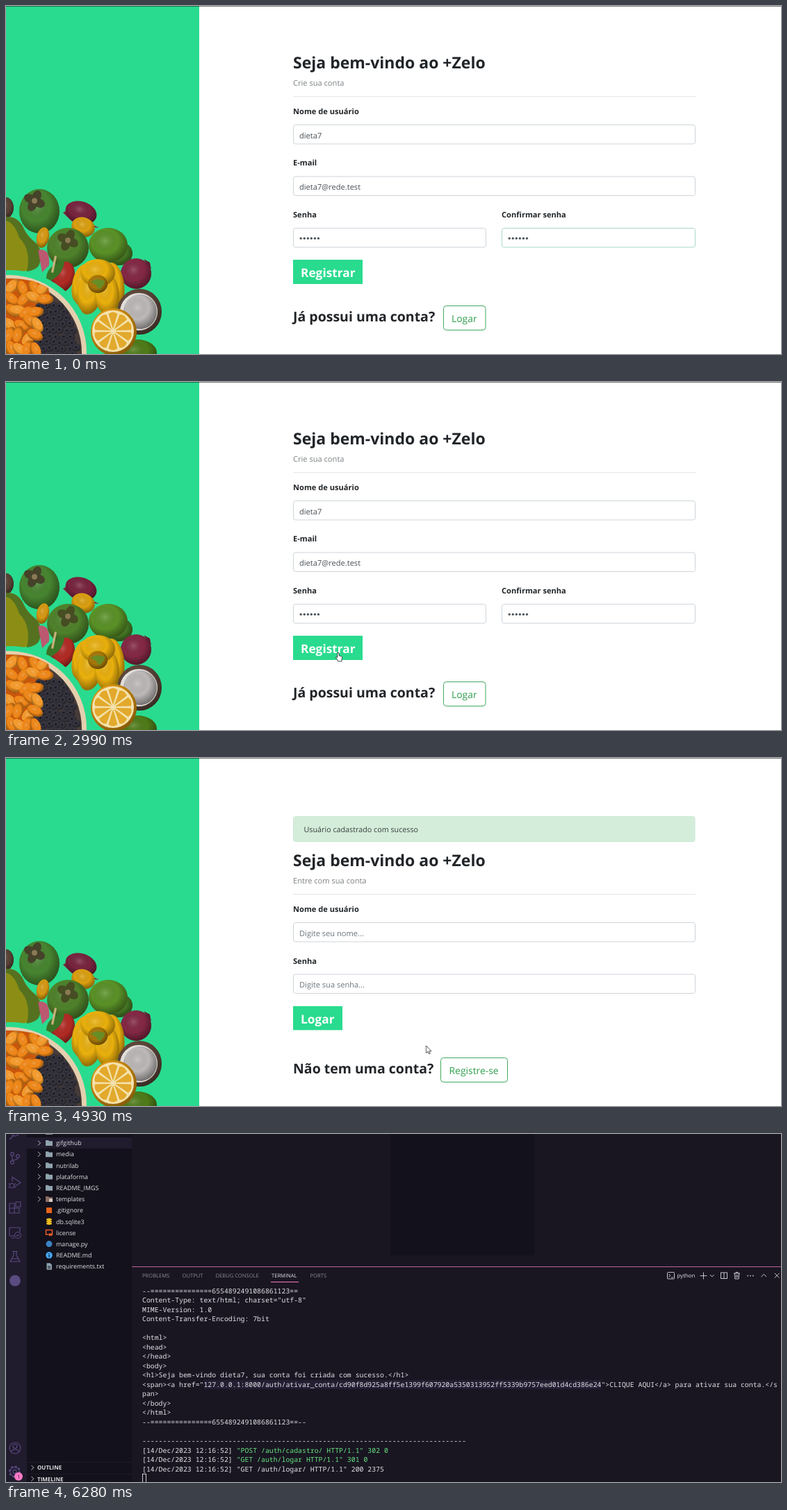
An HTML page for the animation above (8000 ms loop, 1115 px wide and 502 px high).

```html
<!DOCTYPE html>
<html lang="pt-BR">
<head>
<meta charset="utf-8">
<title>Cadastro</title>
<style>
html, body { margin: 0; width: 100%; height: 100%; overflow: hidden; background: #fff; }
svg { display: block; width: 100vw; height: 100vh; }
text { font-family: "Open Sans", "Noto Sans", sans-serif; font-size: 11.1px; fill: #212529; white-space: pre; text-rendering: geometricPrecision; }
.title { font-size: 23px; font-weight: 700; }
.ask { font-size: 19.5px; font-weight: 700; }
.label { font-weight: 700; }
.sub { fill: #7d8184; }
.hint { fill: #6c757d; }
.value { fill: #495057; }
.cta { font-size: 17.3px; font-weight: 700; fill: #fff; }
.alt { font-size: 13.9px; fill: #2f9e4d; }
.field { fill: #fff; stroke: #ced4da; }
.solid, .side { fill: #29db8e; }
.ghost { fill: #fff; stroke: #3fa95c; }
.rule { stroke: #e6e6e6; }

.tree text { font-size: 8.9px; fill: #e1e1e6; }
.tabs text { font-size: 7.6px; fill: #8d8a97; }
.tabs .on, .tabs .shell { fill: #e1e1e6; }
.tabs .shell { font-size: 7.9px; }
.heads text { font-size: 8px; font-weight: 700; fill: #e1e1e6; }
.term text { font-family: "Noto Sans Mono", "DejaVu Sans Mono", monospace; font-size: 9.83px; fill: #e1e1e6; }
.term .ok { fill: #67e480; }
.line { fill: none; stroke: #5a4b81; stroke-width: 1.1; }
.tool { fill: none; stroke: #d5d3dc; stroke-width: .9; }

.register, .login, .editor, .focus, .click, .arrow, .beam, .hand { animation: 8s step-end infinite; }
.register { animation-name: register; }
.login { animation-name: login; }
.editor { animation-name: editor; }
.focus { animation-name: focus; }
.click { animation-name: click; }
.arrow { animation-name: arrow; }
.beam { animation-name: beam; }
.hand { animation-name: hand; }
.pointer { animation: path 8s infinite; }

@keyframes register { 0% { opacity: 1 } 51%, 100% { opacity: 0 } }
@keyframes login { 0% { opacity: 0 } 51% { opacity: 1 } 78.5%, 100% { opacity: 0 } }
@keyframes editor { 0% { opacity: 0 } 78.5%, 100% { opacity: 1 } }
@keyframes focus { 0% { stroke: #a9d9c8 } .875%, 100% { stroke: #ced4da } }
@keyframes click {
  0%, 45.125% { opacity: 0 } 43.375% { opacity: 1 }
  76.875% { opacity: 1 } 78.5%, 100% { opacity: 0 }
}
@keyframes arrow {
  0%, 6.625%, 11%, 21.5%, 25.33% { opacity: 0 }
  3.125%, 7.5%, 16.875%, 24.37%, 61.625% { opacity: 1 }
  72.75%, 100% { opacity: 0 }
}
@keyframes beam {
  0%, 7.5%, 16.875%, 24.37% { opacity: 0 }
  6.625%, 11%, 21.5% { opacity: 1 }
  100% { opacity: 0 }
}
@keyframes hand { 0% { opacity: 0 } 25.33% { opacity: 1 } 61.625%, 100% { opacity: 0 } }
@keyframes path {
  0% { transform: translate(969px, 464px); animation-timing-function: step-end }
  3.125% { transform: translate(969px, 464px); animation-timing-function: steps(4) }
  6.625% { transform: translate(680px, 320px); animation-timing-function: steps(6) }
  11.875% { transform: translate(566.5px, 264px); animation-timing-function: step-end }
  14.25% { transform: translate(566.5px, 264px); animation-timing-function: steps(4, start) }
  17.75% { transform: translate(563px, 276px); animation-timing-function: step-end }
  18.625% { transform: translate(563px, 276px); animation-timing-function: steps(9, start) }
  27.25% { transform: translate(494px, 381px); animation-timing-function: steps(2, start) }
  28.99% { transform: translate(485px, 393px); animation-timing-function: step-end }
  29% { transform: translate(484px, 395px); animation-timing-function: step-end }
  31.5% { transform: translate(484px, 395px); animation-timing-function: steps(7, start) }
  38.35% { transform: translate(478px, 390px); animation-timing-function: step-end }
  61.625% { transform: translate(604.5px, 415px); animation-timing-function: steps(4) }
  65.125% { transform: translate(862px, 462px); animation-timing-function: steps(7) }
  71.125% { transform: translate(1034px, 493px); animation-timing-function: step-end }
  71.875% { transform: translate(1036px, 496px); animation-timing-function: step-end }
  72.75%, 100% { transform: translate(1047px, 508px); animation-timing-function: step-end }
}
</style>
</head>
<body>
<svg viewBox="0 0 1115 502">
  <defs>
    <radialGradient id="shade" cx=".42" cy=".38" r=".62">
      <stop offset="0" stop-color="#fff" stop-opacity=".2"/>
      <stop offset=".55" stop-color="#000" stop-opacity="0"/>
      <stop offset="1" stop-color="#000" stop-opacity=".38"/>
    </radialGradient>
    <clipPath id="bowl"><circle cx="4" cy="500" r="109"/></clipPath>
  </defs>

  <rect width="1115" height="502" fill="#fff"/>
  <rect class="side" width="278" height="502"/>
  <g id="food"></g>
  <rect width="1115" height="1" fill="#000" opacity=".5"/>

  <g class="register">
    <text class="title" x="413" y="90">Seja bem-vindo ao +Zelo</text>
    <text class="sub" x="413" y="114.5">Crie sua conta</text>
    <path class="rule" d="M413 130.5H992"/>
    <text class="label" x="413" y="156">Nome de usuário</text>
    <rect class="field" x="413.5" y="171.5" width="578" height="27.5" rx="3"/>
    <text class="value" x="422" y="190.5">dieta7</text>
    <text class="label" x="413" y="230">E-mail</text>
    <rect class="field" x="413.5" y="246" width="578" height="27.5" rx="3"/>
    <text class="value" x="422" y="264.5">dieta7@rede.test</text>
    <text class="label" x="413" y="305">Senha</text>
    <rect class="field" x="413.5" y="320.5" width="277" height="27.5" rx="3"/>
    <text class="label" x="713" y="305">Confirmar senha</text>
    <rect class="field focus" x="713.5" y="320.5" width="278" height="27.5" rx="3"/>
    <g id="dots" fill="#495057"></g>
    <rect class="solid" x="413" y="366" width="100" height="35"/>
    <text class="cta" x="424" y="390.5">Registrar</text>
    <text class="ask" x="413" y="455.3">Já possui uma conta?</text>
    <rect class="ghost" x="629.5" y="432.5" width="60.5" height="35" rx="4"/>
    <text class="alt" x="641" y="456">Logar</text>
  </g>

  <g class="login">
    <rect x="413.5" y="84.5" width="577.5" height="36" rx="3" fill="#d4edda" stroke="#c8e8d0"/>
    <text x="428.5" y="107" style="font-size:10.75px;fill:#363d39">Usuário cadastrado com sucesso</text>
    <text class="title" x="413" y="156">Seja bem-vindo ao +Zelo</text>
    <text class="sub" x="413" y="180.5">Entre com sua conta</text>
    <path class="rule" d="M413 196.5H992"/>
    <text class="label" x="413" y="222">Nome de usuário</text>
    <rect class="field" x="413.5" y="237.5" width="578" height="27.5" rx="3"/>
    <text class="hint" x="422" y="256.5">Digite seu nome...</text>
    <text class="label" x="413" y="296.5">Senha</text>
    <rect class="field" x="413.5" y="312" width="578" height="27.5" rx="3"/>
    <text class="hint" x="422" y="330.7">Digite sua senha...</text>
    <rect class="solid" x="413" y="358" width="71" height="34.5"/>
    <text class="cta" x="424" y="382.5">Logar</text>
    <text class="ask" x="413" y="455.3">Não tem uma conta?</text>
    <rect class="ghost" x="625.5" y="432.5" width="96" height="35" rx="4"/>
    <text class="alt" x="637.5" y="456">Registre-se</text>
  </g>

  <g class="pointer">
    <circle class="click" r="9" fill="#ffff1e"/>
    <path class="arrow" d="M0 0V10.6L2.5 8.4 4.1 12 5.7 11.3 4.2 7.8H7.4Z" fill="#fff" stroke="#222" stroke-width=".8"/>
    <path class="beam" d="M-2.5-6Q-.3-6 0-5V5Q-.3 6-2.5 6M2.5-6Q.3-6 0-5M2.5 6Q.3 6 0 5" fill="none" stroke="#333" stroke-width=".9"/>
    <path class="hand" d="M-1.2 1Q0-.6 1.1 1V4.8L4.8 5.8Q5.9 6.2 5.7 7.6L4.9 11V13H-.6V11.6L-3.6 7.6Q-3.5 6-2 6.8L-1.2 7.5Z" fill="#fff" stroke="#222" stroke-width=".8"/>
  </g>

  <g class="editor">
    <rect width="1115" height="502" fill="#191622"/>
    <rect width="30" height="502" fill="#201b2d"/>
    <rect x="30" width="151" height="502" fill="#13111b"/>
    <rect x="30" y="5" width="151" height="16" fill="#201b2d"/>
    <rect x="553" y="-32" width="207" height="207" fill="#13111b"/>
    <path d="M181 191.5H1115" stroke="#c75f9e"/>

    <g class="line">
      <path d="M5 8L10 3M9 1Q13 5 18 1"/>
      <circle cx="9" cy="29" r="2.4"/><circle cx="9" cy="41" r="2.4"/><circle cx="17" cy="32" r="2.4"/>
      <path d="M9 31.5V38.5M17 34.5Q17 37.5 9 37.5"/>
      <path d="M9 68V62L21 70 13 75.5"/><circle cx="8.5" cy="74.5" r="3.2"/>
      <path d="M3 72H5M3 77H5M12 72H14M12 77H14"/>
      <path d="M5 100H12V114H5ZM5 107H19V114H12M14 98H21V105H14Z"/>
      <path d="M12 147H5V135H20V141M8 150H12"/><circle cx="17" cy="146" r="4.5"/><path d="M15 146L16.5 147.5 19 144.5"/>
      <path d="M9 169.5H17M11 170V175L6 184H20L15 175V170M8.5 180H17.5"/>
      <circle cx="13" cy="453" r="8"/><circle cx="13" cy="450.5" r="3"/><path d="M7.5 459Q8 455 13 455 18 455 18.5 459"/>
      <circle cx="12.5" cy="487" r="2.6"/><circle cx="12.5" cy="487" r="6.4"/><circle cx="12.5" cy="487" r="7.6" stroke-dasharray="3 2.97" stroke-width="2"/>
    </g>
    <circle cx="13" cy="211.5" r="8" fill="#5a4b81"/>
    <circle cx="18" cy="494" r="6" fill="#ff79c6"/>
    <text x="16.2" y="496.7" style="font-size:7px;fill:#201b2d">1</text>

    <g class="tree" id="tree"></g>
    <g class="heads">
      <path d="M30 473.5H181M30 490.5H181" stroke="#201b2d"/>
      <path class="tool" d="M36.5 478L39.8 481.3 36.5 484.6M36.5 494L39.8 497.3 36.5 500.6"/>
      <text x="45" y="484.3">OUTLINE</text>
      <text x="45" y="500.5">TIMELINE</text>
    </g>

    <g class="tabs">
      <text x="196" y="207">PROBLEMS</text>
      <text x="253.5" y="207">OUTPUT</text>
      <text x="301.5" y="207">DEBUG CONSOLE</text>
      <text class="on" x="382" y="207">TERMINAL</text>
      <text x="437.5" y="207">PORTS</text>
      <path d="M381 213.5H421" stroke="#ff79c6"/>
      <text class="shell" x="965.5" y="207.3">python</text>
    </g>
    <g class="tool">
      <rect x="951.5" y="199.5" width="10" height="9.5" rx="1"/><path d="M953.5 202L956 204.2 953.5 206.5M957 207H960"/>
      <path d="M998.5 204.5H1008.5M1003.5 199.5V209.5M1013 203L1015.8 206 1018.5 203"/>
      <rect x="1028.5" y="200" width="9" height="8.5"/><path d="M1033 200V208.5"/>
      <path d="M1047 201H1056M1050 201V199.5H1053V201M1048.2 201L1048.8 209H1054.2L1054.8 201M1050.5 203V207.3M1052.6 203V207.3"/>
      <path d="M1066.5 204.5H1068M1070.3 204.5H1071.8M1074.1 204.5H1075.6" stroke-width="1.5"/>
      <path d="M1086.5 206L1090.3 202.3 1094 206M1105.8 200.8L1112.5 207.5M1112.5 200.8L1105.8 207.5"/>
    </g>

    <rect x="284.7" y="354.7" width="572" height="13.3" fill="#231e31"/>
    <g class="term" id="term"></g>
    <rect x="196.5" y="490.5" width="5" height="13" fill="none" stroke="#e1e1e6" stroke-width=".9"/>
  </g>
</svg>

<script>
const byId = id => document.getElementById(id);

function add(parent, tag, attrs, text) {
  const el = document.createElementNS(parent.namespaceURI, tag);
  for (const key in attrs) el.setAttribute(key, attrs[key]);
  if (text) el.textContent = text;
  return parent.appendChild(el);
}

let seed = 7;
const rand = () => (seed = seed * 16807 % 2147483647) / 2147483647;

// Still life
const food = byId('food');
function blob(cx, cy, rx, ry, fill, turn = 0, parent = food) {
  const at = { cx, cy, rx, ry, transform: `rotate(${turn} ${cx} ${cy})` };
  add(parent, 'ellipse', { ...at, fill });
  add(parent, 'ellipse', { ...at, fill: 'url(#shade)' });
}
const shape = (d, fill, parent = food) => add(parent, 'path', { d, fill });
function calyx(x, y, size, fill) {
  for (let i = 0; i < 4; i++) {
    const turn = i * 90 + 25;
    add(food, 'ellipse', { cx: x, cy: y - size * .55, rx: size * .45, ry: size * .6, fill, transform: `rotate(${turn} ${x} ${y})` });
  }
  add(food, 'circle', { cx: x, cy: y, r: size * .28, fill: '#8a7a55' });
}

blob(0, 291, 11, 15, '#5a4336');
blob(48, 296, 29, 32, '#478530');
calyx(41, 281, 14, '#45422a');
shape('M82 298Q94 292 98 284L118 312 134 320Q110 318 94 310Z', '#7a2640');
blob(108, 298, 23, 16, '#78243f', 18);
blob(111, 319, 17, 14, '#dca00f', 20);
shape('M0 304Q16 303 24 318 30 332 43 342 54 354 48 372 38 384 0 386Z', '#8c8d14');
shape('M0 304Q16 303 24 318 30 332 43 342 54 354 48 372 46 380 30 383 37 352 19 334 12 312 0 310Z', '#55711f');
shape('M46 352Q64 348 62 374L52 384Z', '#bc5870');
blob(53, 334, 9, 15, '#d99a12', 12);
blob(163, 357, 19, 17, '#477a25');
blob(147, 345, 28, 25, '#5a9227');
blob(89, 349, 30, 29, '#4f822b');
calyx(89, 338, 14, '#464d22');
blob(82, 391, 16, 23, '#b32a24', 20);
shape('M58 392Q58 376 84 366 84 388 58 400Z', '#3b7427');
shape('M70 360L65 384 68 385 73 361Z', '#c8b07a');
blob(187, 386, 22, 22, '#842845');
shape('M198 365L207 370 209 380Z', '#5f1c34');
for (const [x, y, rx, ry, turn] of [[110, 402, 15, 30, 10], [156, 402, 14, 32, -8], [120, 414, 18, 31, 8], [145, 415, 18, 31, -6], [132, 385, 25, 20, 0]])
  blob(x, y, rx, ry, '#eab00d', turn);
blob(132, 401, 14, 13, '#a87808');
shape('M122 398Q131 391 143 397L139 404 134 409 129 402Z', '#678d25');
blob(192, 441, 32, 33, '#5d473b');
add(food, 'circle', { cx: 191, cy: 441, r: 27, fill: '#e2dfdc' });
blob(193, 441, 24, 25, '#bcb9b8');
blob(188, 500, 29, 19, '#4f7c19');
blob(155, 470, 33, 34, '#d9930f');
add(food, 'ellipse', { cx: 154, cy: 469, rx: 30, ry: 30, fill: '#f4e2ad' });
for (let i = 0; i < 10; i++)
  add(food, 'path', { d: 'M154 466L147.5 444Q154 439 160.5 444Z', fill: '#e2a92c', transform: `rotate(${i * 36} 154 469)` });

add(food, 'circle', { cx: 7, cy: 498, r: 117, fill: '#29db8e' });
add(food, 'circle', { cx: 4, cy: 500, r: 112, fill: '#e4cfae' });
const bowl = add(food, 'g', { 'clip-path': 'url(#bowl)' });
add(bowl, 'circle', { cx: 4, cy: 500, r: 105, fill: '#463b38' });
shape('M0 393Q35 392 60 405L66 425 42 440 38 502H0Z', '#c9560c', bowl);
for (let row = 0; row < 9; row++)
  for (let col = 0; col < 9; col++) {
    const x = 48 + col * 9.5 + row % 2 * 4.7 + rand() * 3, y = 431 + row * 8.8 + rand() * 3;
    if (Math.hypot(x - 4, y - 500) > 101) continue;
    blob(x, y, 5.6, 5.6, '#34333d', 0, bowl);
    add(bowl, 'circle', { cx: x - .8, cy: y - .8, r: 1.7, fill: '#191820' });
  }
for (let i = 0; i < 24; i++) {
  const row = Math.floor(i / 4);
  const x = 5 + i % 4 * (row < 2 ? 16 : 12) + rand() * 6;
  blob(x, 401 + row * 18 + rand() * 7, 12, 7.5, i % 3 ? '#f58a18' : '#fa9e2c', rand() * 150 - 75, bowl);
}

// Password bullets
for (const left of [424.2, 724.2])
  for (let i = 0; i < 6; i++)
    add(byId('dots'), 'circle', { cx: left + i * 5.05, cy: 335.2, r: 1.6 });

// File tree
const tree = byId('tree');
const folders = ['gifgithub', 'media', 'nutrilab', 'plataforma', 'README_IMGS', 'templates'];
const files = ['.gitignore', 'db.sqlite3', 'license', 'manage.py', 'README.md', 'requirements.txt'];
const icons = {
  '.gitignore': g => add(g, 'rect', { x: -4, y: -4, width: 8, height: 8, fill: '#e8641b' }),
  'db.sqlite3': g => [-3, 0, 3].forEach(cy => add(g, 'ellipse', { cy, rx: 4, ry: 1.7, fill: '#f0c020' })),
  'license': g => {
    add(g, 'rect', { x: -4.5, y: -4, width: 9, height: 6.5, fill: 'none', stroke: '#f4602e', 'stroke-width': 1.4 });
    add(g, 'path', { d: 'M0 1H4V5L2 3.8 0 5Z', fill: '#f4602e' });
  },
  'manage.py': g => add(g, 'circle', { r: 4.5, fill: '#3c84c4' }),
  'README.md': g => {
    add(g, 'circle', { r: 4.8, fill: '#42a5f5' });
    add(g, 'path', { d: 'M0-2.8V-1.6M0-.6V2.8', stroke: '#13111b', 'stroke-width': 1.2 });
  },
  'requirements.txt': g => {
    add(g, 'path', { d: 'M-3.5-4.8H1.5L4-2.3V4.8H-3.5Z', fill: '#8fa4ae' });
    add(g, 'path', { d: 'M-2 0H2.3M-2 2.3H2.3', stroke: '#13111b' });
  }
};
[...folders, ...files].forEach((name, i) => {
  const y = 13 + i * 16.18;
  const icon = add(tree, 'g', { transform: `translate(62 ${y})` });
  add(tree, 'text', { x: 72, y: y + 3.3 }, name);
  if (icons[name]) return icons[name](icon);
  add(tree, 'path', { class: 'tool', d: `M46 ${y - 3.5}l3.5 3.5-3.5 3.5` });
  const special = name === 'templates';
  add(icon, 'path', { d: 'M-5-4H-1L0-2.7H5V4H-5Z', fill: special ? '#8d6e63' : '#90a4ae' });
  if (special) add(icon, 'rect', { x: 0, y: -.5, width: 5, height: 4.5, fill: '#d7ccc8' });
});
add(tree, 'path', { d: 'M57-3H67V.8H57Z', fill: '#90a4ae' });

// Terminal
const mark = '--' + '='.repeat(15) + '6554892491086861123==';
const stamp = '[14/Dec/2023 12:16:52] ';
const link = '127.0.0.1:8000/auth/ativar_conta/cd90f8d925a8ff5e1399f607920a5350313952ff5339b9757eed01d4cd386e24';
const output = [
  mark,
  'Content-Type: text/html; charset="utf-8"',
  'MIME-Version: 1.0',
  'Content-Transfer-Encoding: 7bit',
  '',
  '<html>', '<head>', '</head>', '<body>',
  '<h1>Seja bem-vindo dieta7, sua conta foi criada com sucesso.</h1>',
  `<span><a href="${link}">CLIQUE AQUI</a> para ativar sua conta.</s`,
  'pan>',
  '</body>', '</html>',
  mark + '--',
  '',
  '-'.repeat(79),
  [stamp, '"POST /auth/cadastro/ HTTP/1.1" 302 0'],
  [stamp, '"GET /auth/logar HTTP/1.1" 301 0'],
  stamp + '"GET /auth/logar/ HTTP/1.1" 200 2375'
];
output.forEach((line, i) => {
  const [head, tail] = [].concat(line);
  const row = add(byId('term'), 'text', { x: 196, y: 229.5 + i * 13.53 }, head);
  if (tail) add(row, 'tspan', { class: 'ok' }, tail);
});
</script>
</body>
</html>
```
